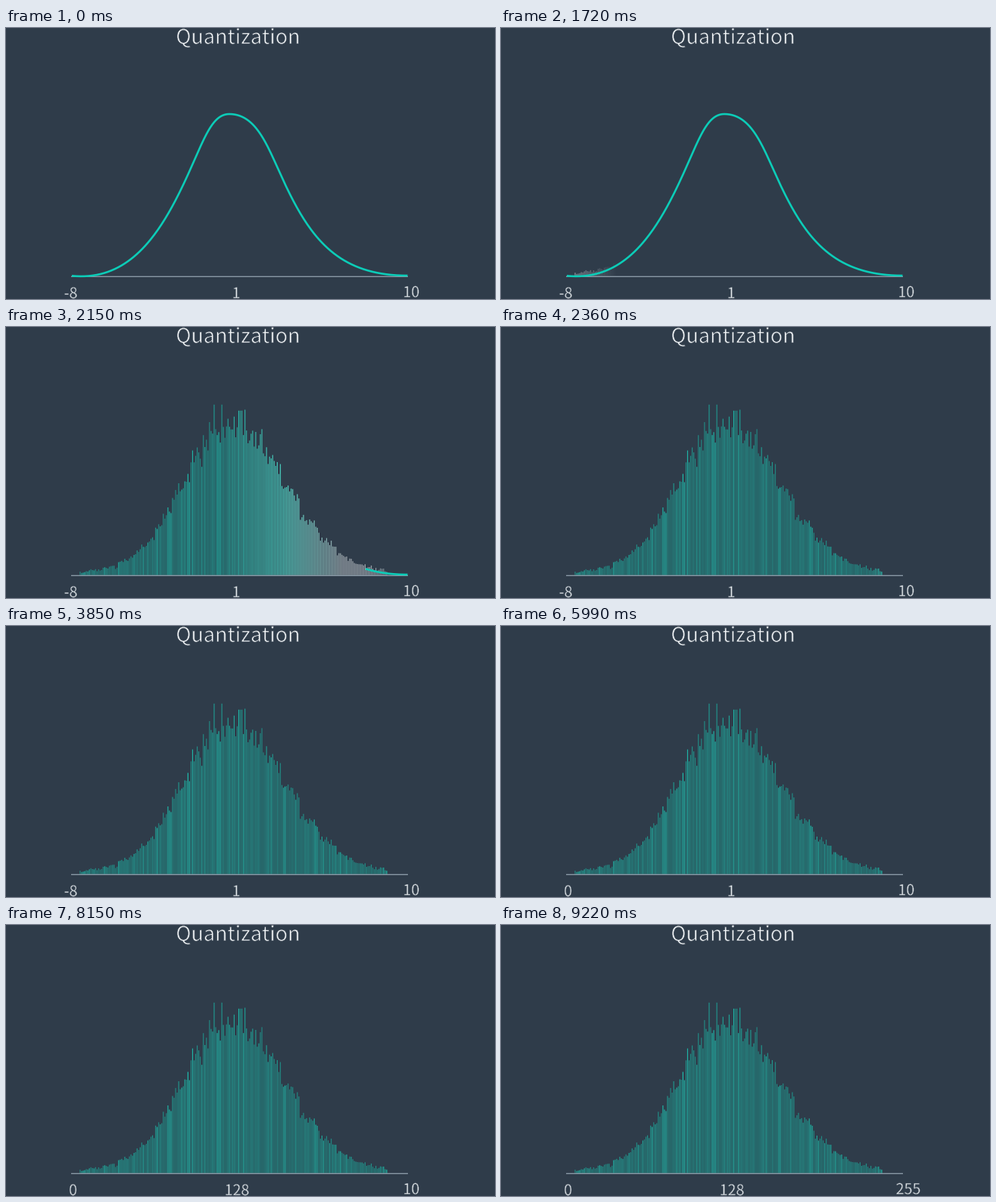
A matplotlib script for the animation above (9430 ms loop, 646 by 359 pixels).

```python
import numpy as np
import matplotlib.pyplot as plt
from matplotlib.animation import FuncAnimation
from matplotlib.collections import LineCollection
from matplotlib.patheffects import Normal, Stroke

W, H, DPI = 646, 359, 64
PT = 72 / DPI                      # points per pixel
LOOP, TICK = 9430, 41
STEP = LOOP / 44                   # the picture moves on in coarse steps
BASE = 328.8

BG = "#2f3c4a"
CURVE = "#0ccdb8"
GREY = np.array([160, 168, 175]) / 255
BRIGHT = np.array([78, 212, 196]) / 255
TEAL = np.array([34, 134, 129]) / 255
VIVID = np.array([30, 190, 173]) / 255


def ramp(v, a, b):
    return np.clip((v - a) / (b - a), 0, 1)


def mix(a, b, u):
    return a + (b - a) * u[:, None]


def bezier(*points):
    t = np.linspace(0, 1, 80)[:, None]
    s = 1 - t
    p0, p1, p2, p3 = map(np.array, points)
    return s**3 * p0 + 3 * s * s * t * p1 + 3 * s * t * t * p2 + t**3 * p3


def bar_heights(x, rng):
    """Skewed bell with soft 24 px terraces, jitter and a few tall spikes."""
    terrace = 208 + 24 * np.floor((x - 196) / 24)
    d = 0.6 * x + 0.4 * terrace - 299
    h = 4 + 196 * np.exp(-0.5 * (d / np.where(d < 0, 63, 70)) ** 2)
    h *= rng.normal(1, 0.055, x.size)
    h *= np.where(h < 14, rng.uniform(0.6, 1.2, x.size), 1)
    for spike, reach, top in ((275, 1.1, 226), (284.5, 1.1, 226), (309, 3.5, 218)):
        h[abs(x - spike) < reach] = top
    return h


bell = np.vstack([
    bezier((87, 328.3), (164, 336), (205, 272), (240, 195)),
    bezier((240, 195), (262, 146.6), (272, 114), (295, 114)),
    bezier((295, 114), (328, 114), (343, 150), (360, 188)),
    bezier((360, 188), (397, 271), (432, 328), (530.5, 328)),
])

rng = np.random.default_rng(8)
xs = 305.5 + 2.035 * np.arange(-102, 98)
heights = bar_heights(xs, rng)
final = mix(TEAL, VIVID, rng.random(xs.size) ** 2)

fig = plt.figure(figsize=(W / DPI, H / DPI), dpi=DPI, facecolor=BG)
ax = fig.add_axes([0, 0, 1, 1])
ax.set_xlim(0, W)
ax.set_ylim(H, 0)
ax.axis("off")

bars = LineCollection([[(x, BASE), (x, BASE - h)] for x, h in zip(xs, heights)],
                      linewidths=1.2 * PT, snap=False)
ax.add_collection(bars)
ax.plot([86, 531], [329.3, 329.3], color="#8f9fab", lw=1.3 * PT,
        solid_capstyle="butt", snap=False)
curve, = ax.plot([], [], color=CURVE, lw=2.6 * PT, solid_capstyle="butt", zorder=3)


def label(x, y, text, size=19.7, thin=0.45, color="#e3e8ec"):
    # A background-coloured outline thins the strokes to a light weight
    return ax.text(x, y, text, fontsize=size * PT, color=color, ha="center",
                   va="baseline", family="Noto Sans CJK JP", weight="light",
                   path_effects=[Normal(), Stroke(linewidth=thin * PT, foreground=BG)])


label(306.5, 21, "Quantization", 27, 0.8, "#f6f9fb")

# Each pair cross-fades between two steps
swaps = [
    (label(85.5, 358, "-8"), label(88.6, 358, "0"), 20, 23),
    (label(304, 358, "1"), label(305, 358, "128"), 32, 35),
    (label(535.3, 356.5, "10"), label(538, 356.5, "255"), 39, 42),
]


def draw(i):
    step = int((i * TICK + TICK) / STEP)

    front = 278 + 197 * (step - 9) if step >= 8 else -200
    lag = front - xs
    rgb = mix(GREY, BRIGHT, ramp(lag, 30, 110))
    rgb += (final - rgb) * ramp(lag, 100, 190)[:, None]
    bars.set_color(np.column_stack([rgb, ramp(lag, -72, -5)]))

    left = bell[bell[:, 0] >= front]
    curve.set_data(left[:, 0], left[:, 1])

    for old, new, a, b in swaps:
        u = ramp(step, a, b)
        old.set_alpha(1 - u)
        new.set_alpha(u)
    return [bars, curve]


anim = FuncAnimation(fig, draw, frames=LOOP // TICK, interval=TICK,
                     repeat=True, repeat_delay=0, blit=False)
plt.show()
```
